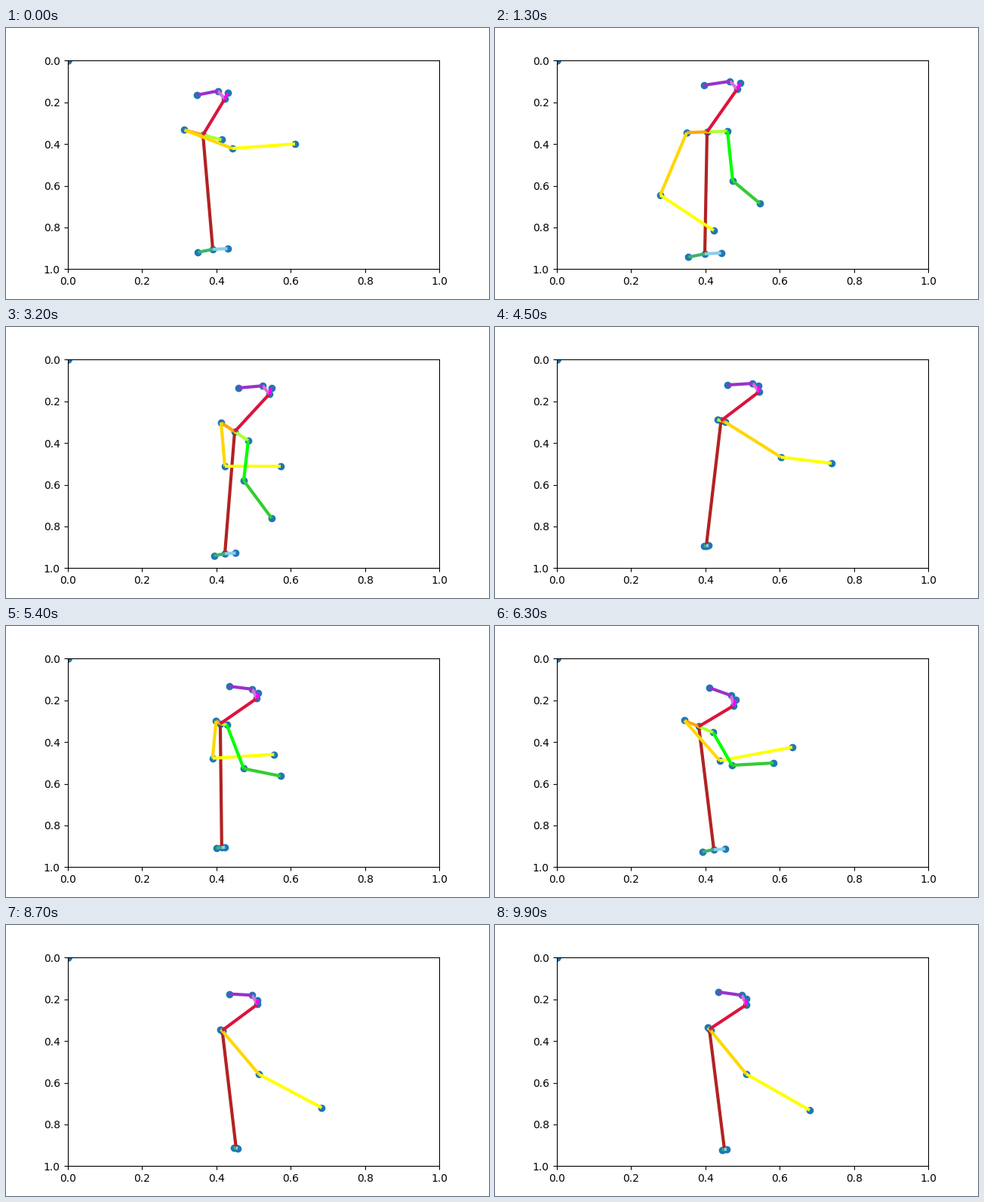
A matplotlib script for the animation above (10 s loop, 640 px wide and 360 px high).

```python
import numpy as np
import matplotlib.pyplot as plt
from matplotlib.animation import FuncAnimation

FRAMES, STEP = 100, 100
LEFT, TOP, WIDTH, HEIGHT = 81.6, 43.2, 492.8, 277.2  # plot area in pixels
UNUSED = 11  # joints never detected, all stacked at the origin

LIMBS = [
    ("neck", "mid_hip", "firebrick"),
    ("neck", "r_shoulder", "orange"),
    ("neck", "l_shoulder", "greenyellow"),
    ("r_shoulder", "r_elbow", "gold"),
    ("r_elbow", "r_wrist", "yellow"),
    ("l_shoulder", "l_elbow", "lime"),
    ("l_elbow", "l_wrist", "limegreen"),
    ("mid_hip", "r_hip", "mediumseagreen"),
    ("mid_hip", "l_hip", "skyblue"),
    ("neck", "nose", "crimson"),
    ("nose", "r_eye", "orchid"),
    ("r_eye", "r_ear", "darkorchid"),
    ("nose", "l_eye", "magenta"),
]

# Eased position along the beats of the movement
BEATS = (0, 1300, 3200, 4500, 6300, 7600, 9900)
t = np.arange(FRAMES) * STEP
raw = np.interp(t, BEATS, range(len(BEATS)))
u = raw % 1
beat = raw - u + (u + u * u * (3 - 2 * u)) / 2


def path(*points, at=range(len(BEATS))):
    """Path through complex points x + yj, one for each beat in `at`."""
    return np.interp(beat, at, points)


def pulse(center, half):
    """Smooth bump from 0 to 1 and back."""
    return np.cos(np.pi / 2 * np.clip((t - center) / half, -1, 1)) ** 2


def build_body():
    neck = path(261+142j, 281+138j, 303+139j, 299.5+124.5j,
                270+133.5j, 288+141j, 284+138.5j)
    nose = path(290+94j, 321+81j, 349+89j, 350+86j,
                316+106j, 333+107j, 333+106j)
    ear = path(253+89j, 277+76j, 308+81j, 308+77j,
               284+82j, 296+92j, 296+89j)
    hip = path(274+294j, 278+300j, 290+301j, 280+290.5j,
               290+297j, 304+294j, 304+298j) + 8j * pulse(2000, 700)

    # Half the shoulder line; the hips and the far eye turn with it
    span = path(24.5+6.5j, 27-1j, 18+12j, -5-1.5j, 19+8j, 0, -2-2j)
    hip_half = np.maximum(3, 0.8 * span.real)
    gaze = (ear - nose) / abs(ear - nose)

    swing = 36 * pulse(2200, 900) + 128 * pulse(5100, 600)
    elbow = path(300+160j, 219+222j, 290+185j, 379+173j,
                 298+179j, 337+198j, 333+198j) - swing
    wrist = path(383+154j, 290+269j, 364+185j, 446+181j,
                 394+161j, 418+239j, 417+246j) - swing

    # The far arm is hidden while the body stands in profile
    seen = ((t >= 700) & (t < 3900)) | ((t >= 5100) & (t < 7000))
    far_elbow = path(315+203j, 315+204j, 314+185j, at=(1, 2, 4))
    far_wrist = path(351+233j, 352+254j, 369+182j, at=(1, 2, 4))

    return dict(
        neck=neck, nose=nose, r_ear=ear, mid_hip=hip,
        r_eye=nose + 14 * gaze * np.exp(1j * np.radians(40)),
        l_eye=nose + 0.15 * span.real - 7.5j,
        r_shoulder=neck - span, l_shoulder=neck + span,
        r_elbow=elbow, r_wrist=wrist,
        l_elbow=np.where(seen, far_elbow, np.nan),
        l_wrist=np.where(seen, far_wrist, np.nan),
        r_hip=hip + hip_half * (-1 + 0.2j),
        l_hip=hip + hip_half * (1 - 0.05j),
    )


rng = np.random.default_rng(4)


def to_axes(z):
    """Add slight tracking noise between beats and scale to axes units."""
    noise = rng.normal(0, 0.6, (FRAMES, 2)) * np.sin(np.pi * u)[:, None]
    xy = np.column_stack([z.real, z.imag]) + noise
    return (xy - (LEFT, TOP)) / (WIDTH, HEIGHT)


body = {name: to_axes(z) for name, z in build_body().items()}

fig, ax = plt.subplots(figsize=(6.4, 3.6), dpi=100)
ax.set_box_aspect(9 / 16)
ax.set(xlim=(0, 1), ylim=(1, 0))
dots = ax.scatter([], [])
lines = [ax.plot([], [], color=color, lw=3, solid_capstyle="butt")[0]
         for *_, color in LIMBS]


def draw(frame):
    joints = [xy[frame] for xy in body.values()]
    dots.set_offsets(np.vstack([joints, np.zeros((UNUSED, 2))]))
    for line, (a, b, _) in zip(lines, LIMBS):
        line.set_data(*np.transpose([body[a][frame], body[b][frame]]))
    return [dots, *lines]


anim = FuncAnimation(fig, draw, frames=FRAMES, interval=STEP, repeat=True,
                     repeat_delay=0)
plt.show()
```
